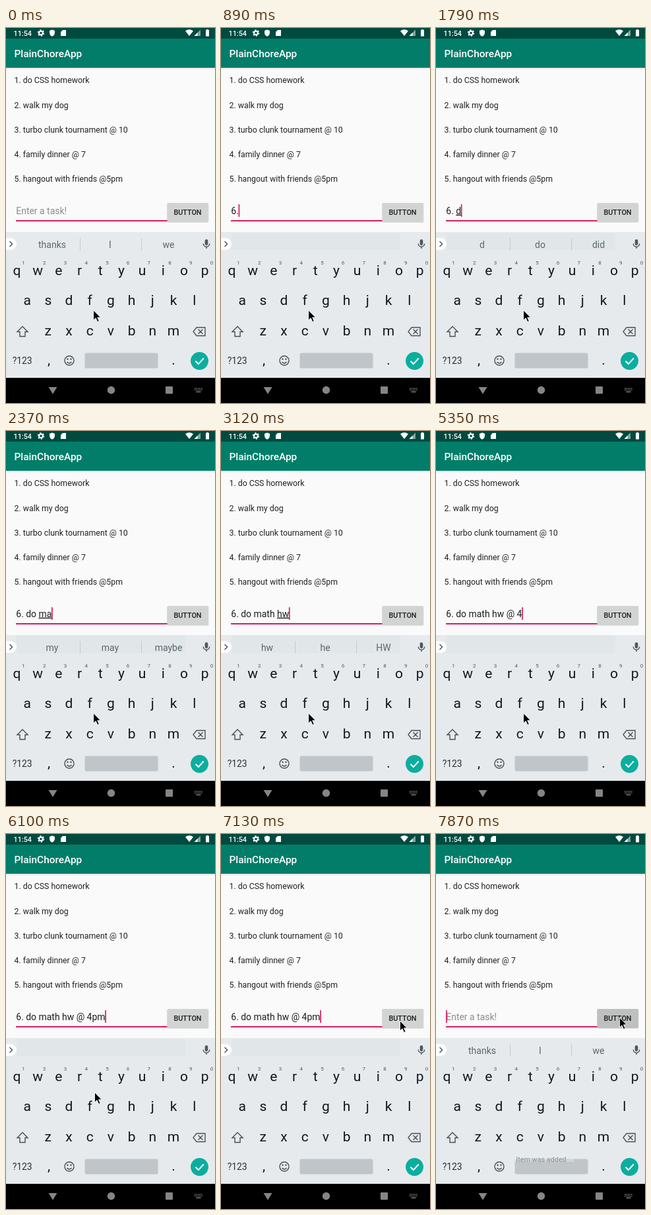
Animation of 317x566 px, one loop 8000 ms. Source, as an HTML page:

```html
<!DOCTYPE html>
<html lang="en">
<head>
<meta charset="utf-8">
<title>To-do list</title>
<style>
  html, body { margin: 0; width: 100%; height: 100%; overflow: hidden; background: #fafafa; }
  svg { display: block; width: 317px; height: 566px; font-family: Roboto, sans-serif; }
  text { white-space: pre; }
  .list { font-size: 12.34px; fill: #212121; }
  .input { font-size: 13.95px; }
  .word { font-size: 14px; fill: #5b676d; text-anchor: middle; }
  .key { font-size: 21px; fill: #10191d; text-anchor: middle; }
  .digit { font-size: 8px; fill: #4d585e; text-anchor: middle; }
  .line { fill: none; stroke: #465056; stroke-width: 1.4; }
  .compose { text-decoration: underline; text-decoration-thickness: 1px; }
</style>
</head>
<body>
<svg viewBox="0 0 317 566">
  <defs>
    <linearGradient id="shade" x2="0" y2="1">
      <stop stop-color="#000" stop-opacity=".12"/><stop offset="1" stop-color="#000" stop-opacity="0"/>
    </linearGradient>
    <clipPath id="toastClip"><rect x="100" y="480" width="140" height="15"/></clipPath>
  </defs>
  <rect width="317" height="566" fill="#fafafa"/>

  <!-- status and title bars -->
  <rect width="317" height="60" fill="#017d69"/>
  <rect width="317" height="16" fill="#014a3f"/>
  <rect y="60" width="317" height="3" fill="url(#shade)"/>
  <g fill="#fff">
    <text x="11.5" y="11.7" font-size="10.8" font-weight="500">11:54</text>
    <circle cx="53" cy="7.5" r="2.8" fill="none" stroke="#fff" stroke-width="2"/>
    <circle cx="53" cy="7.5" r="4.4" fill="none" stroke="#fff" stroke-width="1.6" stroke-dasharray="2.3"/>
    <path d="M70 2.5l4 1.6v3q0 4-4 5.6q-4-1.6-4-5.6v-3z"/>
    <path d="M86 3h5v9h-8v-6z"/>
    <path d="M272 4.5q6-4.5 12 0l-6 7.5zM290.5 7v5h-5zM303 3h1.2v-1h2.6v1h1.2v9.5h-5z"/>
    <path d="M295 2.5v9.5h-9.5z" opacity=".5"/>
    <text x="12.5" y="44.4" font-size="15.4" font-weight="500">PlainChoreApp</text>
  </g>
  <g id="tasks" class="list"></g>

  <!-- entry row -->
  <rect x="15" y="290" width="230" height="2" fill="#d81b60"/>
  <text id="entry" class="input" x="15.3" y="280.7"><tspan id="typed"></tspan><tspan id="composing" class="compose"></tspan></text>
  <rect id="caret" y="266" width="1.7" height="19" fill="#d81b60"/>
  <rect x="244" y="264.5" width="63.5" height="29.5" rx="2" fill="#000" opacity=".1"/>
  <rect id="button" x="244.5" y="264" width="62.5" height="29" rx="1.5"/>
  <text x="275.5" y="282.4" font-size="10.8" font-weight="500" text-anchor="middle" fill="#1c1c1c">BUTTON</text>

  <!-- keyboard -->
  <rect y="308" width="317" height="220" fill="#e6eaed"/>
  <rect id="stripShade" x="16" y="309" width="256" height="26" fill="#e1e6e9"/>
  <g id="strip">
    <path d="M112.5 317v19M205.5 317v19" stroke="#c5cbce"/>
    <text class="word" x="70" y="331.5"></text>
    <text class="word" x="158" y="331.5"></text>
    <text class="word" x="246.5" y="331.5"></text>
  </g>
  <path d="M0 317h7a9 9 0 0 1 0 18h-7z" fill="#fff"/>
  <path class="line" d="M5.5 322l4 4-4 4" stroke-width="1.7"/>
  <g fill="#4d585e">
    <rect x="301.7" y="319" width="4.6" height="9" rx="2.3"/>
    <path class="line" d="M299.3 325.5a4.7 4.7 0 0 0 9.4 0M304 330v3"/>
  </g>
  <g id="keys"></g>
  <path class="line" d="M25 450.5l8 8h-4v7h-8v-7h-4z"/>
  <path class="line" d="M289 452h13v12.5h-13l-5-6.2zM291.5 454.8l7 7M298.5 454.8l-7 7"/>
  <text x="9.7" y="507" font-size="13.9" fill="#263035">?123</text>
  <text class="key" x="65" y="507.5">,</text>
  <text class="key" x="254" y="507.5">.</text>
  <circle class="line" cx="96" cy="502" r="7"/>
  <path class="line" d="M92.5 504q3.5 4 7 0"/>
  <g fill="#465056"><circle cx="93.5" cy="499.8" r="1.2"/><circle cx="98.5" cy="499.8" r="1.2"/></g>
  <rect x="119.5" y="490.5" width="111" height="23" rx="2.5" fill="#bfc5c8"/>
  <circle cx="293.5" cy="502.5" r="13.5" fill="#0bae9e"/>
  <path d="M287.5 502.8l4.3 4.3 8-8.6" fill="none" stroke="#fff" stroke-width="2"/>
  <g id="toast" clip-path="url(#toastClip)">
    <rect x="110" y="483" width="100" height="26" rx="13" fill="#e8eaeb" opacity=".4"/>
    <text x="159.5" y="494.5" font-size="10.8" text-anchor="middle" fill="#8d9295">Item was added</text>
  </g>

  <!-- navigation bar -->
  <rect y="528" width="317" height="38"/>
  <g fill="#858585">
    <path d="M64.5 542h13l-6.5 10.5z"/>
    <circle cx="159.5" cy="546.5" r="5.7"/>
    <rect x="242" y="541" width="11" height="11" rx="1"/>
    <path d="M286 544h12M286 546.5h12" stroke="#777" stroke-width="1.5" stroke-dasharray="1.5 1"/>
    <rect x="288.5" y="548.5" width="7" height="1.4"/>
  </g>
  <path id="mouse" d="M0 0v15l3.5-3.2 2.6 5.8 2.5-1.1-2.6-5.6h4.8z" fill="#000" stroke="#fff" stroke-width=".9"/>
</svg>
<script>
const $ = id => document.getElementById(id);
const LOOP = 8000;

function addText(parent, className, x, y, content) {
  const node = document.createElementNS("http://www.w3.org/2000/svg", "text");
  node.setAttribute("class", className);
  node.setAttribute("x", x);
  node.setAttribute("y", y);
  node.textContent = content;
  parent.append(node);
}

["do CSS homework", "walk my dog", "turbo clunk tournament @ 10", "family dinner @ 7", "hangout with friends @5pm"]
  .forEach((task, i) => addText($("tasks"), "list", 12.5, 83.4 + 37.2 * i, `${i + 1}. ${task}`));

[["qwertyuiop", 16.4, 372.7], ["asdfghjkl", 32.1, 418], ["zxcvbnm", 63.8, 464]].forEach(([row, left, y]) =>
  [...row].forEach((letter, i) => {
    const x = left + 31.7 * i;
    addText($("keys"), "key", x, y, letter);
    if (row.length === 10) addText($("keys"), "digit", x + 10.2, 357, (i + 1) % 10);
  }));

// [start, committed text, word being composed, suggestions, strip opacity]
const typing = [
  [0, "", "", "thanks I we"],
  [600, "6", "", "thanks I we", .4],
  [890, "6.", "", ""],
  [1190, "6. ", "", ""],
  [1790, "6. ", "d", "d do did"],
  [1940, "6. ", "do", "do don't dog"],
  [2090, "6. do ", "", "you it that"],
  [2240, "6. do ", "m", "my me more"],
  [2370, "6. do ", "ma", "my may maybe"],
  [2670, "6. do ", "math", "math maths matters"],
  [2820, "6. do math ", "", "homework and is"],
  [3120, "6. do math ", "hw", "hw he HW"],
  [3420, "6. do math hw ", "", "to and for"],
  [3860, "6. do math hw @", "", "to and for", .4],
  [4005, "6. do math hw @", "", ""],
  [4150, "6. do math hw @ ", "", "to I you"],
  [5200, "6. do math hw @ 4", "", "to I you", .4],
  [5350, "6. do math hw @ 4", "", ""],
  [5500, "6. do math hw @ 4p", "", ""],
  [5800, "6. do math hw @ 4pm", "", ""],
  [7720, "", "", "thanks I we"]
];
const pointer = [
  [0, 132.7, 426], [6100, 134.5, 390], [6250, 205, 318], [6400, 300, 252], [6550, 305, 250],
  [6700, 290, 268], [6840, 276, 281], [7130, 271.5, 282], [7280, 278.5, 277]
];
const caretHidden = [[0, 600], [4600, 5200], [6400, 6840], [7280, 7720]];

const at = (steps, t) => steps.findLast(step => step[0] <= t);

function draw(t) {
  const [, committed, word, suggestions, opacity = 1] = at(typing, t);
  const empty = !committed && !word;
  $("typed").textContent = empty ? "Enter a task!" : committed;
  $("composing").textContent = word;
  $("entry").setAttribute("fill", empty ? "#8c8c8c" : "#1f1f1f");

  const width = empty ? 0 : $("entry").getComputedTextLength();
  $("caret").setAttribute("x", 15 + width);
  $("caret").setAttribute("visibility", caretHidden.some(([a, b]) => t >= a && t < b) ? "hidden" : "visible");

  const words = suggestions.split(" ");
  $("strip").querySelectorAll("text").forEach((node, i) => node.textContent = words[i] || "");
  $("strip").setAttribute("opacity", suggestions ? opacity : 0);
  $("stripShade").setAttribute("opacity", empty ? 0 : 1);

  $("button").setAttribute("fill", t >= 7570 ? "#bebfbf" : "#d2d3d3");
  $("toast").setAttribute("opacity", t >= 7870 ? 1 : 0);
  const [, x, y] = at(pointer, t);
  $("mouse").setAttribute("transform", `translate(${x} ${y})`);
}

function tick() {
  draw(performance.now() % LOOP);
  requestAnimationFrame(tick);
}
tick();
</script>
</body>
</html>
```
